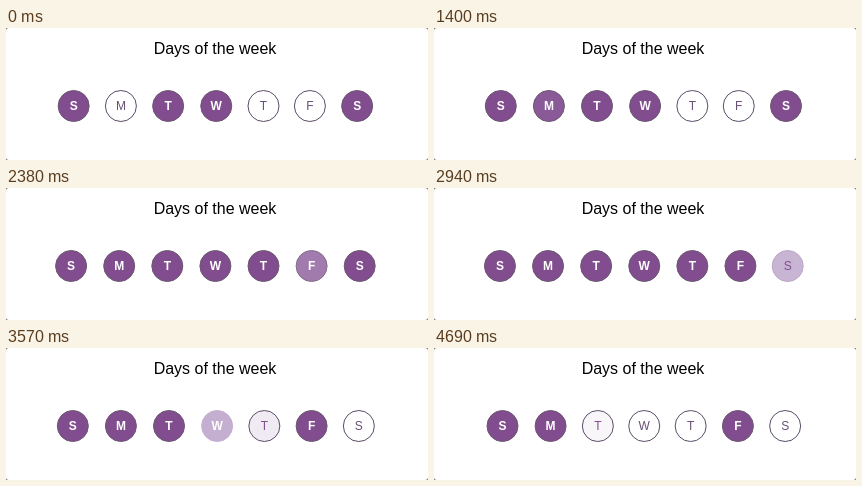
Animation of 422x132 px, one loop 4.83 s. Source, as an HTML page with a canvas:

```html
<!DOCTYPE html>
<html lang="en">
<head>
<meta charset="utf-8">
<title>Days of the week</title>
<style>
  html, body { margin: 0; width: 100%; height: 100%; overflow: hidden; background: #fff; }
  canvas { display: block; width: 422px; height: 132px; }
</style>
</head>
<body>
<canvas id="stage"></canvas>
<script>
const WIDTH = 422, HEIGHT = 132, LOOP = 4830, STEP = 70;
const FADE = 330;
const CENTER_X = 209.4, ROW_Y = 78, RADIUS = 15.5;
const SLOT_ON = 48.1, SLOT_OFF = 46.4;
const FONT = '"Liberation Sans", Arial, sans-serif';

const WHITE = [255, 255, 255];
const PURPLE = [129, 77, 143];
const LAVENDER = [197, 175, 208];
const OUTLINE = [91, 76, 104];
const RIM = [108, 88, 112];

const LETTERS = [...'SMTWTFS'];
const INITIAL = [true, false, true, true, false, false, true];
const TAPS = [
  { day: 1, press: 1050, release: 1190 },
  { day: 4, press: 1880, release: 1880 },
  { day: 5, press: 2200, release: 2275 },
  { day: 6, press: 2660, release: 2930 },
  { day: 4, press: 3350, release: 3410 },
  { day: 3, press: 3560, release: 3980 },
  { day: 2, press: 4335, release: 4470 }
];

const canvas = document.getElementById('stage');
const ctx = canvas.getContext('2d');
const ratio = window.devicePixelRatio || 1;
canvas.width = Math.round(WIDTH * ratio);
canvas.height = Math.round(HEIGHT * ratio);
ctx.scale(ratio, ratio);

const mix = (a, b, k) => a.map((v, i) => v + (b[i] - v) * k);
const rgb = c => `rgb(${c.map(Math.round).join(',')})`;
const easeOut = k => k * (2 - k);

function dayState(day, time) {
  let on = INITIAL[day];
  let pressed = false;
  let progress = 1;
  for (const tap of TAPS) {
    if (tap.day !== day || time < tap.press) continue;
    pressed = time < tap.release;
    if (!pressed) {
      on = !on;
      progress = easeOut(Math.min(1, (time - tap.release) / FADE));
    }
  }
  if (pressed) progress = 0;
  return {
    on,
    fill: mix(LAVENDER, on ? PURPLE : WHITE, progress),
    rim: mix(LAVENDER, on ? RIM : OUTLINE, Math.min(1, progress * 1.4)),
    text: on ? WHITE : pressed || progress < 1 ? PURPLE : [104, 80, 118]
  };
}

function label(text, x, y, font, color) {
  ctx.font = `${font} ${FONT}`;
  ctx.textAlign = 'center';
  ctx.textBaseline = 'alphabetic';
  ctx.fillStyle = color;
  ctx.fillText(text, x, y);
}

function drawDay(letter, x, state) {
  ctx.beginPath();
  ctx.arc(x, ROW_Y, RADIUS, 0, Math.PI * 2);
  ctx.fillStyle = rgb(state.fill);
  ctx.fill();
  ctx.lineWidth = 1;
  ctx.strokeStyle = rgb(state.rim);
  ctx.stroke();
  label(letter, x, ROW_Y + 4.3, `${state.on ? 'bold ' : ''}12px`, rgb(state.text));
}

function draw(time) {
  ctx.fillStyle = '#777';
  ctx.fillRect(0, 0, WIDTH, HEIGHT);
  ctx.beginPath();
  ctx.roundRect(0, 0, WIDTH, HEIGHT, 3);
  ctx.fillStyle = '#fff';
  ctx.fill();

  label('Days of the week', 209, 26, '16px', '#000');

  const states = LETTERS.map((_, day) => dayState(day, time));
  const slots = states.map(s => s.on ? SLOT_ON : SLOT_OFF);
  let left = CENTER_X - slots.reduce((sum, w) => sum + w, 0) / 2;
  states.forEach((state, day) => {
    drawDay(LETTERS[day], left + slots[day] / 2, state);
    left += slots[day];
  });
}

const start = performance.now();
function tick() {
  const elapsed = (performance.now() - start) % LOOP;
  draw(Math.floor(elapsed / STEP) * STEP);
  requestAnimationFrame(tick);
}
tick();
</script>
</body>
</html>
```
